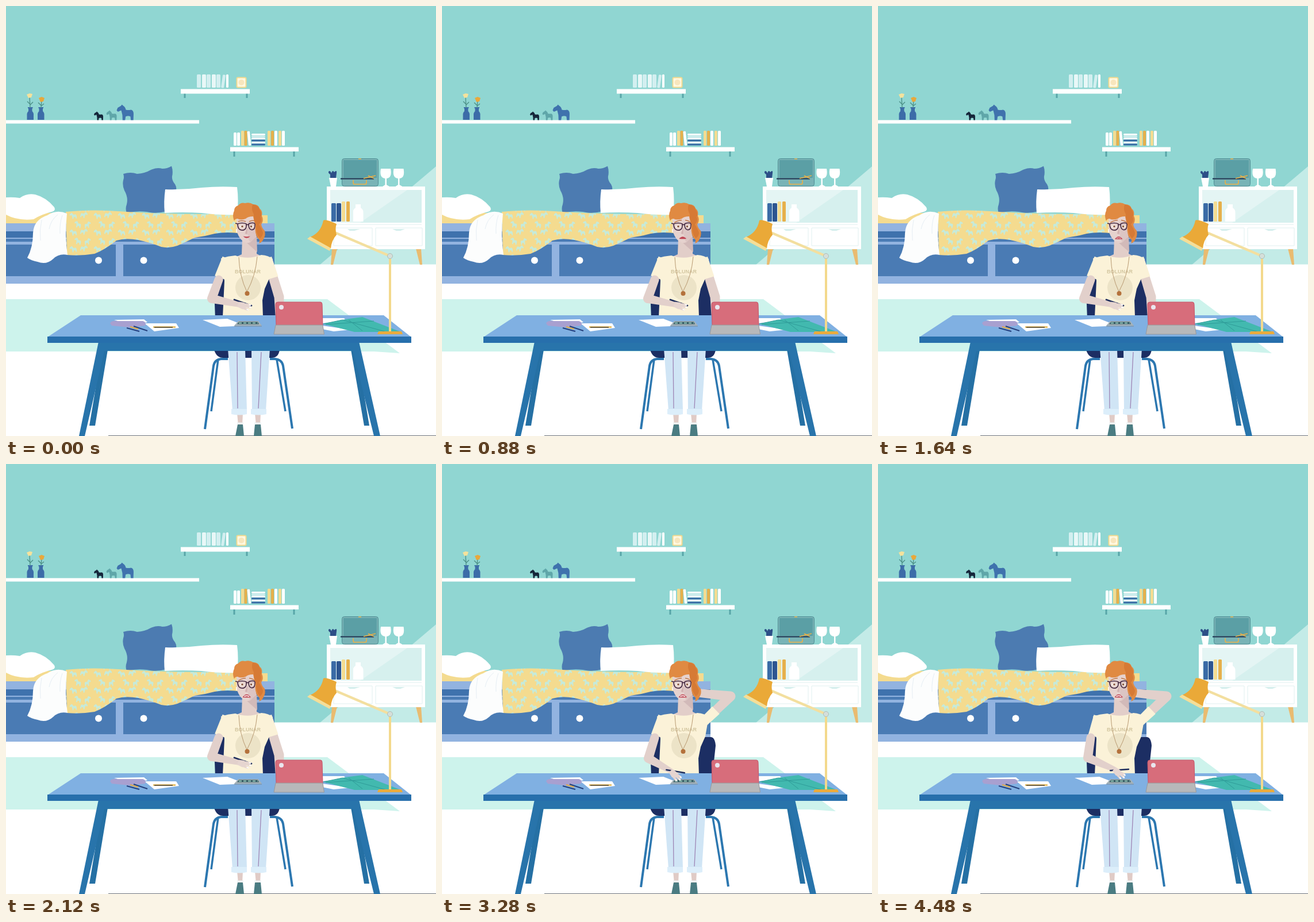
An HTML page for the animation above (4520 ms loop, 748x748 px).

```html
<!DOCTYPE html>
<html lang="en">
<head>
<meta charset="utf-8">
<title>At the desk</title>
<style>
html,body{margin:0;width:100%;height:100%;overflow:hidden;background:#fff}
svg{display:block;width:100vw;height:100vh}
</style>
</head>
<body>
<svg viewBox="0 0 748 748" xmlns="http://www.w3.org/2000/svg">
<defs>
  <path id="horse" d="M0 5.500L1 3L4 1.200L5 0L6 1Q8 2 8.700 5Q11 5.600 13.500 5Q16 5.500 16 9L15.800 15H13.400L13 11.500Q11 10.500 8.500 11.500L8 15H5.600L5.400 10Q4.800 7.500 4.300 5.600L1.200 7Z"/>
  <pattern id="herd" width="42" height="29" x="106" y="358" patternUnits="userSpaceOnUse">
    <rect width="42" height="29" fill="#f4db8f"/>
    <g fill="#c6ead9">
      <use href="#horse" transform="translate(4 2) rotate(-8) scale(.75)"/>
      <use href="#horse" transform="translate(37 1) rotate(14) scale(-.75 .75)"/>
      <use href="#horse" transform="translate(14 15) rotate(12) scale(.75)"/>
      <use href="#horse" transform="translate(41 16) rotate(-8) scale(-.7 .75)"/>
    </g>
  </pattern>
</defs>

<g id="room">
  <rect width="748" height="450" fill="#90d6d2"/>
  <path d="M748 279V450H546Z" fill="#c3ebe7"/>
  <rect y="449.500" width="748" height="299" fill="#fff"/>
  <path d="M0 510H559L685 604L640 601H0Z" fill="#cdf3ec"/>
  <path d="M178 747.500H748" stroke="#6b7278"/>
</g>

<g id="shelves">
  <path d="M311 152V160M419 152V160M397 252V262M501 252V262" stroke="#58a5a8" stroke-width="3"/>
  <path d="M0 198.500H336V204.500H0ZM304 144.500H424V152.500H304ZM390 245.500H509V253H390Z" fill="#fff"/>
  <g id="books"></g>
  <rect x="401.500" y="124.500" width="16" height="17" rx="2" fill="#fff8e0" stroke="#f2d98f" stroke-width="2"/>
  <circle cx="409.500" cy="133" r="5" fill="#f8e6bd"/>
  <g fill="#3c6ca8">
    <path id="vase" d="M38 176H46.500V178H45.500V183Q48.500 186 48 190V198H36.500V190Q36 186 39 183V178H38Z"/>
    <use href="#vase" x="18.500"/>
  </g>
  <path d="M42 177L41 158M42 171L37 166M42 172L47 167M61 177L62 164M61 173L56 168M61 174L66 170" stroke="#4b8f86" stroke-width="1.300" fill="none"/>
  <path d="M36 154L41 152L46 153L44 159L39 160Z" fill="#f5e29c"/>
  <path d="M57 160L62 158L67 160L65 166L60 167Z" fill="#e8a83c"/>
  <use href="#horse" transform="translate(153 183.500)" fill="#15263a"/>
  <use href="#horse" transform="translate(174.500 181.500) scale(1.130)" fill="#5fa6a9"/>
  <use href="#horse" transform="translate(192.500 171.500) scale(1.840 1.800)" fill="#3f72ad"/>
</g>

<g id="bed">
  <rect y="378" width="467" height="105" fill="#92b3e0"/>
  <path d="M0 405H467V410H0ZM0 415H191V470H0ZM204 415H467V470H204Z" fill="#4a7bb4"/>
  <path d="M0 392H467V403H0Z" fill="#3f72ad"/>
  <path d="M0 360H90V378H0ZM390 364H455V378H390Z" fill="#f4db8f"/>
  <path d="M0 333Q12 332 24 334Q36 325 51 328Q70 333 84 350Q87 356 80 358Q62 362 48 371Q20 374 0 363Z" fill="#fff"/>
  <path d="M204 292Q217 288 228 292Q242 291 252 285Q263 280 272 283Q280 283 288 278.500Q291 287 289 296Q288 303 294 310Q298 317 295 322L279 357Q262 362 245 358Q226 356 210 360Q207 353 210 345Q213 333 206 321Q202 312 204 303Q206 298 204 292Z" fill="#4c7bb1"/>
  <path d="M104 358Q150 353 210 358Q300 364 400 361L442 366V380Q430 392 410 396Q385 392 363 396Q345 401 328 403Q312 411 298 417Q284 422 270 419Q250 411 230 407Q208 403 192 408Q172 424 154 431Q130 435 106 433Z" fill="url(#herd)"/>
  <path d="M277 319Q308 320 340 316Q372 313 402 315Q405 338 402 363Q372 364 340 360Q308 358 276 360Q274 340 277 319Z" fill="#fff"/>
  <path d="M72 364Q88 353 106 361Q102 400 107 433Q92 430 82 440Q70 451 55 445Q44 443 37 438Q47 420 47 395Q48 372 72 364Z" fill="#fcfdfd"/>
  <path d="M90 363Q78 372 75 388M98 364Q93 378 94 396M62 372Q58 390 60 408" stroke="#e6eef4" fill="none"/>
  <g fill="#fff"><circle cx="161" cy="442.500" r="6"/><circle cx="239.500" cy="442.500" r="6"/></g>
</g>

<g id="cabinet">
  <path d="M567 422H576L569 450H565ZM713 422H722L724 450H720Z" fill="#e9bb70"/>
  <rect x="558" y="314" width="171" height="109" fill="#fff"/>
  <rect x="564" y="320" width="159" height="57" fill="#e4f5f4"/>
  <path d="M698 320H723V377H616Z" fill="#d6f0ee"/>
  <path d="M570 386H637V417H570ZM643 386H724V417H643ZM564 380H723" fill="none" stroke="#e0f0f0"/>
  <path d="M594 388H616L606 391H598ZM672 388H694L686 391H679Z" fill="#d3eeec"/>
  <path d="M608 345H617V351Q622 354 621.500 360V375H604V360Q603 354 608 351Z" fill="#fff"/>
  <path d="M562 299H576L574 314H565Z" fill="#fff"/>
  <path d="M564 299V293Q559 290 562 287Q565 287 566 291Q568 284 571 289Q576 284 575 291L574 299Z" fill="#2d4f87"/>
  <rect x="584.500" y="265.500" width="63" height="48" rx="4" fill="#79b3b6" stroke="#4f8d93"/>
  <path d="M587 268H645V299H587Z" fill="#5b9fa5"/>
  <path d="M582 300.500H640" stroke="#1e3350" stroke-width="2"/>
  <path d="M604 303V308Q604 310 607 310H624Q627 310 627 308V303M622 300L643 295M630 295L640 300M613 266H618" stroke="#e8b04a" stroke-width="1.700" fill="none"/>
  <g id="glass"><path d="M652 283H669Q672 299 662 300V311L667 314H655L659.500 311V300Q649 299 652 283Z" fill="#fff"/></g>
  <use href="#glass" x="22.500"/>
</g>

<g id="chair" fill="none" stroke="#2c77b0" stroke-width="4">
  <path d="M368 477Q372 473 380 475H468Q475 476 476 490L470 545H364L362 490Q362 482 368 477Z" fill="#1c2e63" stroke="none"/>
  <path d="M369 615L357 705M471 615L486 705" stroke-width="3.500"/>
  <path d="M362 598H476Q474 612 462 612H378Q366 612 362 598Z" fill="#1c2e63" stroke="none"/>
</g>

<g id="legs">
  <path d="M402 708H412L411 730H404ZM433 708H443L442 730H435Z" fill="#e0cbc6"/>
  <path d="M386 596H416L419 704H394ZM427 596H459L452 704H428Z" fill="#d0e5f5"/>
  <path d="M392 701H419V710Q406 713 392 710ZM426 701H453V710Q440 713 426 710Z" fill="#dceefa"/>
  <path d="M402 602L403 700M444 602L439 700" stroke="#9d85b5" stroke-width="1.300"/>
  <path d="M403 728H412L414 748H399ZM433 728H443L445 748H431Z" fill="#4a7c82"/>
  <path d="M402 726H413M432 726H444" stroke="#eef4f5" stroke-width="3"/>
  <path d="M346 736L361 626Q363 615 374 614H386M459 614H468Q480 615 482 626L498 735" fill="none" stroke="#2c77b0" stroke-width="4"/>
</g>

<path id="armR" fill="#e2d0cb"/>
<g id="torso">
  <path d="M411 404H436V431L446 436L424 446L399 437L410 432Z" fill="#e2cec9"/>
  <path d="M419 412L436 399L437 428Q430 422 419 412Z" fill="#d2bab9"/>
  <path id="sleeveR" fill="#fbf2d8"/>
  <path id="sleeveL" fill="#fbf2d8"/>
  <path d="M399 434Q421 442 444 433Q457 434 464 440L458 474L450 492L446 512L447 541H377L380 478L374 439Q386 435 399 434Z" fill="#fbf2d8"/>
  <circle cx="421" cy="490" r="22" fill="#ece3c7"/>
  <text x="420.500" y="465" text-anchor="middle" font-family="'Liberation Sans',Arial,sans-serif" font-weight="700" font-size="9" fill="#d3c6a0">BOLUNAR</text>
  <path d="M405 437Q406 470 419 497Q434 470 437 436" fill="none" stroke="#b89a72"/>
  <circle cx="419.500" cy="500" r="4" fill="#b4713b"/>
</g>

<g id="head">
  <path d="M401 364H435V401L425 411Q418 414 412 409Q403 402 401 388Z" fill="#e6d2ce"/>
  <path d="M420 376H435V401L425 411L421 404Z" fill="#dcc5c3"/>
  <path d="M420 385L415.500 396L420 397" fill="#d2b3b3"/>
  <g id="eyes">
    <ellipse cx="410.500" cy="383.500" rx="4" ry="2.600" fill="#f6ece4"/><ellipse cx="427" cy="383.500" rx="3.700" ry="2.600" fill="#f6ece4"/>
    <circle cx="411" cy="383.500" r="1.800" fill="#8a5a45"/><circle cx="426.500" cy="383.500" r="1.800" fill="#8a5a45"/>
  </g>
  <path id="lids" fill="#d9bfbd" d="M405 380H416V384H405ZM422 380H432V384H422Z"/>
  <path id="brows" fill="none" stroke="#c07a4c" stroke-width="1.500"/>
  <path d="M399 378L403 379Q411 376 418 379Q419 390 411 390Q403 390 403 379M418 381Q420 379.500 422 381M422 379Q427 376 433 378Q434 389.500 427.500 389.500Q422 389 422 379M433 379H437" fill="none" stroke="#41263f" stroke-width="1.500"/>
  <path id="mouth" fill="#bf4452"/>
  <path id="teeth" fill="none" stroke="#fff" stroke-width="1.700"/>
  <path d="M397 374Q393 364 397 356Q397 349 404 347Q408 341 416 343Q424 341 430 345Q439 345 441 352Q447 357 445 365Q449 373 444 380Q445 386 450 391Q452 399 448 405Q446 411 440 413Q443 406 438 404Q432 396 434 380Q431 374 430 366Q421 366 417 370Q408 373 403 370Q398 370 397 374Z" fill="#e08a42"/>
  <path d="M429 345Q440 347 441 354Q446 360 443 367Q446 374 440 380Q445 388 447 394Q447 400 442 404Q435 399 435 381Q430 372 431 362Q426 354 429 345Z" fill="#d67a35"/>
  <path d="M401 388V394" stroke="#fff" stroke-width="1.500"/>
</g>

<g id="desk">
  <path d="M167 598H177L155 730H145ZM600 598H610L632 730H623Z" fill="#2570a4"/>
  <path d="M161 584H175L137 748H127ZM600 584H614L651 748H640Z" fill="#2874ab"/>
  <path d="M162 584H613V600H162Z" fill="#2874ab"/>
  <path d="M130 538H657L705 576H72Z" fill="#80b0e2"/>
  <rect x="72" y="575" width="633" height="11" fill="#276fac"/>
  <path d="M188 546L240 545L246 550L220 556ZM241 552L296 552L301 560L258 566ZM342 546L385 544L403 551L397 557L372 558ZM550 543H588L592 547L550 552ZM550 556L600 563L570 566L550 562Z" fill="#fff"/>
  <path d="M181 552Q183 547 194 548L238 548Q245 550 242 556L214 559L184 556Z" fill="#a8a0d0"/>
  <path d="M210 560L232 566M222 557L246 565" stroke="#25407c" stroke-width="2"/>
  <path d="M216 558L230 562" stroke="#e3a944" stroke-width="2"/>
  <path d="M256 558.500H295" stroke="#e3b750" stroke-width="2.500"/><path d="M258 559H290" stroke="#333" stroke-width="1.300"/>
  <path d="M552 553L590 545L620 541L687 567H606Z" fill="#42b9af"/>
  <path d="M552 553L585 546L662 567M596 546L620 565M556 554L640 548" fill="none" stroke="#2f9c99"/>
  <path d="M404 548H439L445 556H397Z" fill="#a5b2b8"/>
  <path d="M405 549.500H438L440 553.500H402Z" fill="#385d66"/>
  <path d="M405 551.500H438" stroke="#8fc3b6" stroke-width="2" stroke-dasharray="5 3"/>
  <path d="M397 557H445" stroke="#7e8b93"/>
  <path d="M473 515H547Q550 515 550 519L551 556H470L469 519Q469 515 473 515Z" fill="#d76d7b" stroke="#c4566a"/>
  <circle cx="479" cy="524" r="4" fill="#e9e6ee"/>
  <path d="M469 555H551L553.500 571H466Z" fill="#b7b8ba" stroke="#97999d"/>
</g>

<g id="lamp">
  <path d="M572 394L668 435" stroke="#f3df9f" stroke-width="4.500"/>
  <path d="M668 436V567" stroke="#f3d98c" stroke-width="4"/>
  <circle cx="668" cy="435" r="4.500" fill="#d5dfda" stroke="#aebdb8"/>
  <path d="M648 566H688L690 571H646Z" fill="#e9ab3d"/>
  <path d="M552 373Q556 370 575 379Q572 388 575 398Q566 408 565 422L529 402Q548 394 552 373Z" fill="#eaa938"/>
  <path d="M529 401L565 421L563 426L524 405Z" fill="#f4de98"/>
</g>

<path id="armL" fill="#e2d0cb"/>
<path id="pen" d="M-16 0H16" stroke="#1d2c5c" stroke-width="2.500" stroke-linecap="round"/>
<g id="hand" fill="#e6d5d0" stroke="#e6d5d0" stroke-linecap="round">
  <path d="M0 -4L9 -5Q14 -3 14 2L9 6L0 4Z"/>
  <path d="M10 -3L20 -4M11 0L21.500 0M9 4L18 5" stroke-width="3.600"/>
  <path d="M19 -4H21M20.500 0H22.500M17 5H19" stroke="#fff" stroke-width="2"/>
</g>
</svg>

<script>
const LOOP = 4520, STEP = 40;
const $ = id => document.getElementById(id);
const set = (id, name, value) => $(id).setAttribute(name, value);
const ease = x => { x = Math.max(0, Math.min(1, x)); return x * x * (3 - 2 * x); };
const ramp = (t, from, to) => ease((t - from) / (to - from));

// Keys are [time, ...values]; values are eased from key to key.
function track(t, keys) {
  let i = keys.findIndex(k => k[0] > t);
  if (i < 0) return keys[keys.length - 1].slice(1);
  if (!i) return keys[0].slice(1);
  const a = keys[i - 1], b = keys[i], p = ramp(t, a[0], b[0]);
  return a.slice(1).map((v, j) => v + (b[j + 1] - v) * p);
}

// Tapered capsule between two points.
function limb([x, y], [u, v], r, s) {
  const d = Math.hypot(u - x, v - y) || 1, nx = (y - v) / d, ny = (u - x) / d;
  return `M${x + nx * r} ${y + ny * r}A${r} ${r} 0 0 1 ${x - nx * r} ${y - ny * r}` +
    `L${u - nx * s} ${v - ny * s}A${s} ${s} 0 0 1 ${u + nx * s} ${v + ny * s}Z`;
}

function sleeve([x, y], [u, v]) {
  const d = Math.hypot(u - x, v - y), dx = (u - x) / d, dy = (v - y) / d;
  const at = (along, side) => `${x + dx * along - dy * side} ${y + dy * along + dx * side}`;
  return `M${at(-9, 8)}L${at(-9, -8)}L${at(27, -9)}L${at(27, 9)}Z`;
}

function addBooks() {
  const book = (x, y, w, h, fill, tilt = 0) =>
    `<rect x="${x}" y="${y}" width="${w}" height="${h}" rx="1.5" fill="${fill}" transform="rotate(${tilt} ${x} ${y + h})"/>`;
  const white = '#fff', pale = '#d3eff0', yellow = '#f3dc92', gold = '#e6b04b', blue = '#3a6ba6';
  let out = '';
  [332, 341, 349, 358, 366].forEach((x, i) => out += book(x, 119, 7, 23, i % 2 ? '#e8f7f7' : pale));
  out += book(374, 119, 5, 23, pale, 8) + book(383, 119, 4, 23, white);
  [[396, white], [402, white], [409, yellow], [414.5, gold], [455, yellow], [461, gold],
   [467, white], [474, yellow], [480, white]].forEach(([x, c], i) => {
    const h = i < 2 ? 23 : 26;
    out += book(x, 243 - h, 5, h, c);
  });
  out += book(422, 218, 4.5, 25, white, -6);
  [white, pale, white, blue, white, blue].forEach((c, i) => out += book(427, 222 + i * 3.5, 24, 3, c));
  [[566, blue], [575, '#2d5590'], [584, yellow], [592, gold]].forEach(([x, c], i) =>
    out += book(x, i < 2 ? 343 : 340, i < 2 ? 8 : 6, i < 2 ? 32 : 35, c));
  $('books').innerHTML = out;
  $('cabinet').append(...[...$('books').children].slice(-4));
}

function drawArms(t) {
  const typing = t > 2600 ? Math.sin((t - 2600) / 280 * 2 * Math.PI) : 0;
  const [ex, ey, wx, wy, turn] = track(t, [
    [2240, 358, 509, 404, 519, 14], [2600, 359, 512, 398, 534, 40],
    [3900, 359, 512, 398, 533, 44], [4200, 365, 511, 411, 532, 44]]);
  const [px, py, tilt] = track(t, [
    [2240, 412, 516, 19], [2600, 408, 535, 4], [2800, 408, 536, 2],
    [3800, 404, 532, 18], [4200, 420, 533, -4]]);
  const elbowL = [ex, ey], wristL = [wx, wy + typing];
  set('armL', 'd', limb([370, 476], elbowL, 7.5, 8) + limb(elbowL, wristL, 8, 4.5));
  set('sleeveL', 'd', sleeve([381, 447], elbowL));
  set('hand', 'transform', `translate(${wristL}) rotate(${turn + typing * 4})`);
  set('pen', 'transform', `translate(${px} ${py + typing}) rotate(${tilt})`);

  const [ax, ay, bx, by] = track(t, [
    [2600, 475, 506, 476, 545], [2800, 484, 501, 470, 532],
    [3040, 504, 455, 484, 425], [3280, 502, 404, 443, 398]]);
  const shoulder = [457, 447], elbowR = [ax, ay];
  const k = 24 / Math.hypot(ax - 457, ay - 447);
  const start = [457 + (ax - 457) * k, 447 + (ay - 447) * k];
  set('armR', 'd', limb(start, elbowR, 8, 8.5) + limb(elbowR, [bx, by], 8.5, 7));
  set('sleeveR', 'd', sleeve(shoulder, elbowR));
}

function drawFace(t) {
  const sad = ramp(t, 120, 440), open = ramp(t, 1480, 1800);
  const mix = (a, b) => a + (b - a) * sad;
  const corner = mix(400.5, 405), top = mix(402, 399.5), low = mix(407, 404.5) - open;
  const left = 412.5 - open, right = 425 + open;
  set('mouth', 'd', `M${left} ${corner + open}Q418.500 ${top - 2 * sad - 2 * open} ${right} ${corner + open}` +
    `Q418.500 ${low + sad + 2 * open} ${left} ${corner + open}Z`);
  set('teeth', 'd', `M${left + 3} ${corner - .5}Q418.500 ${corner - 3} ${right - 3} ${corner - .5}`);
  set('teeth', 'opacity', open);
  set('brows', 'd', `M404 ${mix(375, 377)}Q410 ${mix(372, 373)} 417 ${mix(375, 372.5)}` +
    `M423 ${mix(375, 372.5)}Q428 ${mix(372, 373)} 433 ${mix(374, 376.5)}`);
  set('lids', 'opacity', ramp(t, 2640, 2720) * (1 - ramp(t, 3080, 3160)));
}

function render(now) {
  const t = Math.floor(now % LOOP / STEP) * STEP;
  drawArms(t);
  drawFace(t);
}

addBooks();
const start = performance.now();
function tick() {
  render(performance.now() - start);
  requestAnimationFrame(tick);
}
tick();
</script>
</body>
</html>
```
